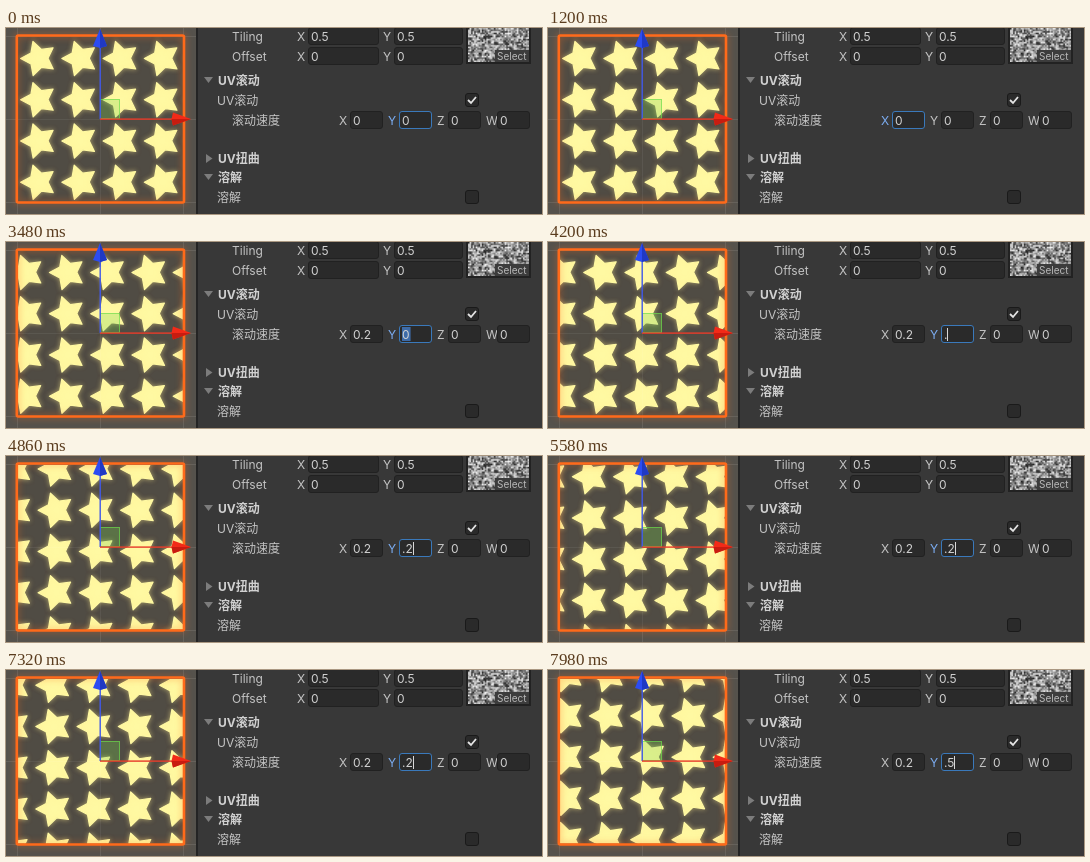
An HTML page with a canvas for the animation above (8 s loop, 536 by 186 pixels).

```html
<!DOCTYPE html>
<html lang="zh">
<head>
<meta charset="utf-8">
<style>
html, body { margin: 0; width: 100%; height: 100%; overflow: hidden; background: #383838; }
canvas { display: block; }
</style>
</head>
<body>
<canvas id="stage" width="536" height="186"></canvas>
<script>
const ctx = document.getElementById('stage').getContext('2d');
const LOOP = 8000, STEP = 60;
const TILE = 41.25;          // distance between stars
const SCROLL = 68;           // pixels per second at speed 0.2
const LAST_EDIT = 7800;      // the scroll clock skips ahead here
const EDIT_SKIP = 26;        // pixels skipped at speed 0.2
const FONT = '12px Inter, "Noto Sans CJK SC", "Noto Sans CJK", sans-serif';
const TEXT = '#c4c4c4', BLUE = '#7cadf2';

// Typing in the speed fields: from this time on, the field shows this
const xStates = [
  [0, { text: '0' }],
  [420, { text: '0', hover: true }],
  [1200, { text: '0', focus: true }],
  [1260, { text: '0', focus: true, selected: true }],
  [2400, { text: '.', focus: true, caret: true }],
  [2700, { text: '.2', focus: true, caret: true }],
  [3240, { text: '0.2' }]
];
const yStates = [
  [0, { text: '0', focus: true }],
  [1200, { text: '0' }],
  [3240, { text: '0', focus: true, selected: true }],
  [4140, { text: '.', focus: true, caret: true }],
  [4500, { text: '.2', focus: true, caret: true }],
  [7560, { text: '.', focus: true, caret: true }],
  [LAST_EDIT, { text: '.5', focus: true, caret: true }]
];
const stateAt = (states, ms) => states.filter(s => s[0] <= ms).pop()[1];
const mod = (a, n) => ((a % n) + n) % n;

function rect(x, y, w, h, color) {
  ctx.fillStyle = color;
  ctx.fillRect(x, y, w, h);
}

function roundBox(x, y, w, h, fill, stroke, radius = 2.5) {
  ctx.beginPath();
  ctx.roundRect(x + .5, y + .5, w - 1, h - 1, radius);
  ctx.fillStyle = fill;
  ctx.fill();
  ctx.strokeStyle = stroke;
  ctx.lineWidth = 1;
  ctx.stroke();
}

function polygon(color, ...points) {
  ctx.beginPath();
  points.forEach(([x, y]) => ctx.lineTo(x, y));
  ctx.closePath();
  ctx.fillStyle = color;
  ctx.fill();
}

function label(text, x, y, color = TEXT, bold = false) {
  ctx.font = (bold ? 'bold ' : '') + FONT;
  ctx.fillStyle = color;
  ctx.fillText(text, x, y);
}

function field(name, x, y, w, state) {
  const { text, focus, hover, selected, caret } = state;
  label(name, x - 11, y + 14, focus ? BLUE : TEXT);
  roundBox(x, y, w, 18, '#2a2a2a', focus ? '#3a79bb' : hover ? '#656565' : '#212121');
  ctx.font = FONT;
  const width = ctx.measureText(text).width;
  if (selected) rect(x + 3, y + 2, width + 1, 14, '#3d6ba8');
  label(text, x + 3, y + 14, '#d2d2d2');
  if (caret) rect(Math.round(x + 3 + width), y + 3, 1, 13, '#d8d8d8');
}

function checkbox(x, y, checked) {
  roundBox(x, y, 14, 14, '#2a2a2a', '#1a1a1a');
  if (!checked) return;
  ctx.beginPath();
  ctx.moveTo(x + 3, y + 7);
  ctx.lineTo(x + 6, y + 10);
  ctx.lineTo(x + 11, y + 4);
  ctx.strokeStyle = '#e4e4e4';
  ctx.lineWidth = 1.8;
  ctx.stroke();
}

function foldout(text, y, open) {
  if (open) polygon('#7c7c7c', [198, y - 8], [207, y - 8], [202.5, y - 2]);
  else polygon('#7c7c7c', [200, y - 9], [206.5, y - 4.5], [200, y]);
  label(text, 212, y, '#d0d0d0', true);
}

// Smooth black and white noise for the texture thumbnail
const noise = document.createElement('canvas');
noise.width = 40;
noise.height = 22;
{
  const n = noise.getContext('2d');
  let seed = 7;
  for (let i = 0; i < 40 * 22; i++) {
    seed = (seed * 16807) % 2147483647;
    const gray = 35 + 210 * seed / 2147483647;
    n.fillStyle = `rgb(${gray},${gray},${gray})`;
    n.fillRect(i % 40, Math.floor(i / 40), 1, 1);
  }
}

const star = new Path2D();
for (let i = 0; i < 10; i++) {
  const angle = -Math.PI / 2 - .32 + i * Math.PI / 5;
  const r = i % 2 ? 9.4 : 18;
  star.lineTo(r * Math.cos(angle), r * Math.sin(angle));
}
star.closePath();

function drawStars(dx, dy) {
  ctx.save();
  ctx.beginPath();
  ctx.rect(12, 9, 165, 164.5);
  ctx.clip();
  rect(12, 9, 165, 165, '#504c44');
  ctx.shadowColor = 'rgba(255,235,140,.5)';
  ctx.shadowBlur = 5;
  ctx.fillStyle = ctx.strokeStyle = '#fff9a2';
  ctx.lineWidth = 1.2;
  ctx.lineJoin = 'round';
  const left = 32.6 + mod(dx, TILE) - TILE, top = 30.4 + mod(dy, TILE) - TILE;
  for (let row = 0; row < 6; row++) {
    for (let col = 0; col < 6; col++) {
      ctx.save();
      ctx.translate(left + col * TILE, top + row * TILE);
      ctx.fill(star);
      ctx.stroke(star);
      ctx.restore();
    }
  }
  ctx.restore();
}

function drawScene(ms, xSpeed, ySpeed) {
  rect(0, 0, 191, 186, '#55524c');
  for (const x of [11, 94, 177]) rect(x, 0, 1, 186, '#65625c');
  for (const y of [8, 91, 174]) rect(0, y, 191, 1, '#65625c');

  const skip = ms >= LAST_EDIT ? EDIT_SKIP : 0;
  const shift = 2 + SCROLL * (ms - 6360) / 1000 + skip;
  drawStars(-shift * xSpeed / .2, shift * ySpeed / .2);
  rect(94, 9, 1, 164, 'rgba(255,255,255,.06)');
  rect(12, 91, 165, 1, 'rgba(255,255,255,.06)');

  ctx.save();
  ctx.shadowColor = 'rgba(255,110,30,.6)';
  ctx.shadowBlur = 7;
  ctx.strokeStyle = '#ff6a1a';
  ctx.lineWidth = 2.6;
  ctx.beginPath();
  ctx.roundRect(10.8, 7.5, 167.2, 167, 1.5);
  ctx.stroke();
  ctx.restore();

  // Move handles
  rect(94, 72, 19, 19, 'rgba(120,210,80,.28)');
  ctx.strokeStyle = 'rgba(110,220,75,.75)';
  ctx.lineWidth = 1;
  ctx.strokeRect(94.5, 71.5, 19, 19);
  rect(93.5, 19, 1.4, 72, '#4058e8');
  rect(94, 90.4, 73, 1.4, '#e63a28');
  polygon('#2c4cf2', [94, 1], [101, 18], [94, 20], [87, 18]);
  polygon('#2039c4', [94, 1], [101, 18], [94, 20]);
  polygon('#f22a18', [185, 91], [167, 84.5], [165.5, 91], [167, 97.5]);
  polygon('#c81c10', [185, 91], [165.5, 91], [167, 97.5]);
}

function drawInspector(xState, yState) {
  rect(190, 0, 346, 186, '#383838');
  rect(190, 0, 2, 186, '#242424');

  [['Tiling', -1, '0.5'], ['Offset', 19, '0']].forEach(([name, y, text]) => {
    label(name, 226, y + 14);
    field('X', 302, y, 71, { text });
    field('Y', 388, y, 69, { text });
  });
  rect(460, 0, 65, 36, '#222');
  ctx.drawImage(noise, 462, 0, 61, 34);
  rect(489, 22, 34, 12, '#3c3c3c');
  ctx.font = '10px Inter, sans-serif';
  ctx.fillStyle = '#b8b8b8';
  ctx.fillText('Select', 491, 32);

  foldout('UV滚动', 57, true);
  label('UV滚动', 211, 77);
  checkbox(459, 65, true);
  label('滚动速度', 226, 97);
  field('X', 344, 83, 33, xState);
  field('Y', 393, 83, 33, yState);
  field('Z', 442, 83, 33, { text: '0' });
  field('W', 491, 83, 33, { text: '0' });

  foldout('UV扭曲', 135, false);
  foldout('溶解', 154, true);
  label('溶解', 211, 174);
  checkbox(459, 162, false);
}

function frame(now) {
  const ms = Math.floor((now % LOOP) / STEP) * STEP;
  const xState = stateAt(xStates, ms), yState = stateAt(yStates, ms);
  const speed = state => parseFloat(state.text) || 0;
  drawScene(ms, speed(xState), speed(yState));
  drawInspector(xState, yState);
  requestAnimationFrame(frame);
}
frame(0);
</script>
</body>
</html>
```
